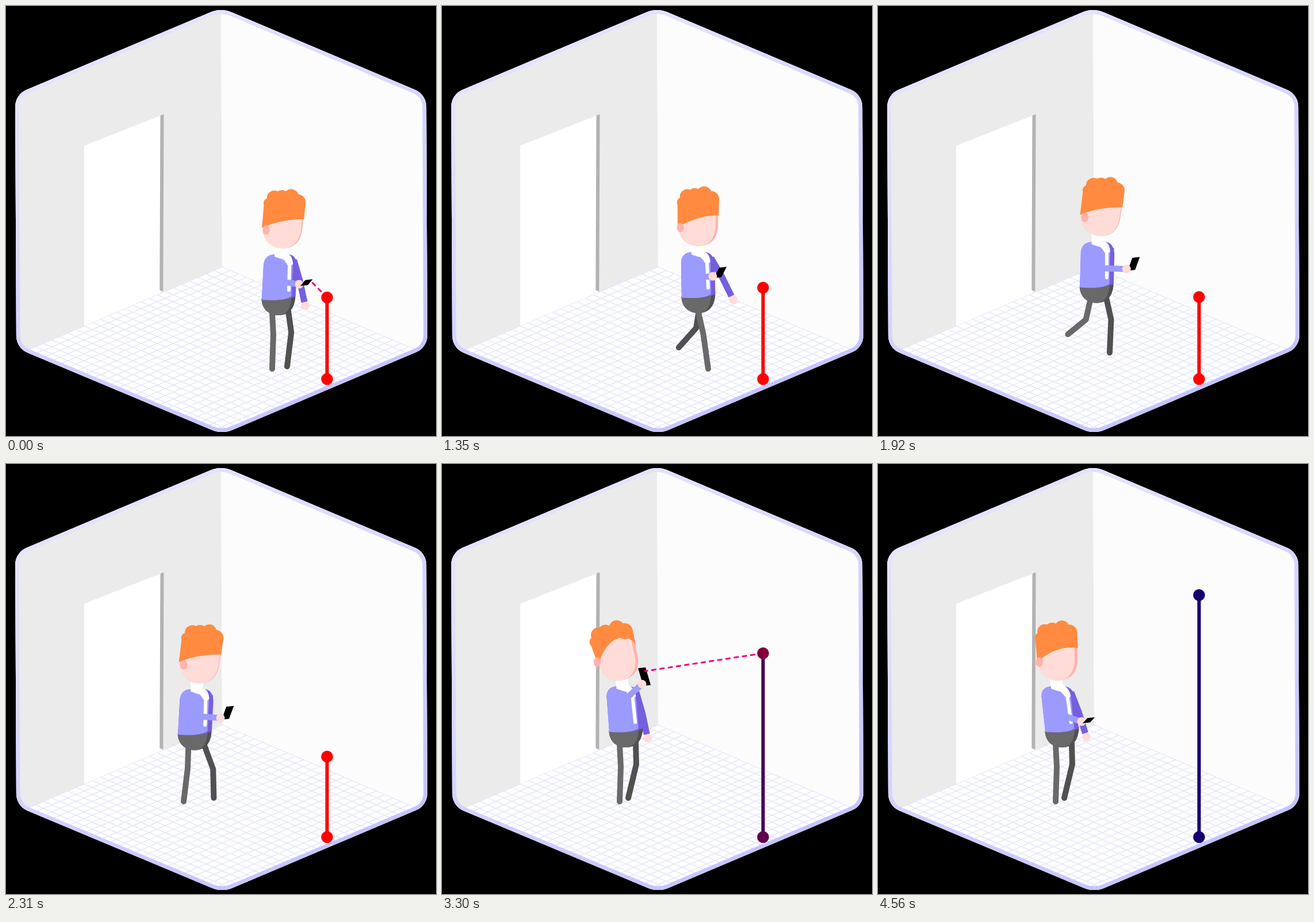
An HTML page with a canvas that plays this animation: 748x748 px, repeating every 4.59 s.

```html
<!DOCTYPE html>
<html lang="en">
<head>
<meta charset="utf-8">
<title>Measuring a height</title>
<style>
  html, body { margin: 0; width: 100%; height: 100%; overflow: hidden; background: #000; }
  canvas { display: block; width: 748px; height: 748px; }
</style>
</head>
<body>
<canvas id="stage" width="748" height="748"></canvas>
<script>
const LOOP = 4590;
const stage = document.getElementById('stage');
const room = document.createElement('canvas');
room.width = room.height = 748;
let g = room.getContext('2d');

// ---- drawing helpers ----
function trace(pts) {
  g.beginPath();
  pts.forEach(([x, y]) => g.lineTo(x, y));
}

function poly(color, pts) {
  g.fillStyle = color;
  trace(pts);
  g.fill();
}

function shape(color, path) {
  g.fillStyle = color;
  g.fill(new Path2D(path));
}

function disc(color, x, y, r, ry = r) {
  g.fillStyle = color;
  g.beginPath();
  g.ellipse(x, y, r, ry, 0, 0, 7);
  g.fill();
}

function line(color, width, pts, cap = 'round') {
  g.strokeStyle = color;
  g.lineWidth = width;
  g.lineCap = cap;
  g.lineJoin = 'round';
  trace(pts);
  g.stroke();
}

function at([x, y], draw) {
  g.save();
  g.translate(x, y);
  draw();
  g.restore();
}

// ---- maths helpers ----
const rad = deg => deg * Math.PI / 180;
const add = (a, b) => [a[0] + b[0], a[1] + b[1]];
const mix = (a, b, k) => a.map((v, i) => v + (b[i] - v) * k);
const clamp = (v, lo, hi) => Math.min(hi, Math.max(lo, v));
const ramp = (t, from, to) => clamp((t - from) / (to - from), 0, 1);
const smooth = u => u * u * (3 - 2 * u);

// Eases through [time, value] keys.
const keys = (t, [first, ...rest]) => rest.reduce(
  ([t0, v], [t1, next]) => [t1, v + (next - v) * smooth(ramp(t, t0, t1))], first)[1];

// ---- motion ----
const nod = t => keys(t, [[0, 5], [1350, 0], [2100, 8], [3680, -17], [3850, -17], [4560, -3]]);
const lean = t => keys(t, [[0, 4], [1350, 0], [2310, 4], [3700, -5.3]]);
const pitch = t => keys(t, [[0, 50], [1350, 63], [1920, 70], [2400, 70], [3680, 116], [3850, 116], [4560, 48]]);
const swing = t => keys(t, [[0, 14], [1350, 28], [1920, -10], [2310, -10], [2970, 10], [3700, 19]]);
const reach = t => keys(t, [[0, 36], [1350, 25], [1920, 52], [2970, 29], [3850, 26], [4560, 34]]);
const raise = t => keys(t, [[0, 25], [1350, 35], [2310, 27], [2650, 27], [3680, 105], [3850, 105], [4560, 16]]);
const ray = t => keys(t, [[0, 507], [350, 517], [1350, 490], [2100, 509], [2790, 509], [3650, 228]]);

function waist(t) {
  const w = ramp(t, 1000, 2370) ** 1.25;
  return add(mix([474, 509], [320, 464], w), [0, 6 * Math.sqrt(Math.sin(Math.PI * Math.min(w, 0.9999)))]);
}

// One stride: the foot glides along the floor line and peaks late.
function stride(t, start, end, a, b) {
  const u = ramp(t, start, end);
  const lift = u * u * (1 - u) * Math.hypot(b[0] - a[0], b[1] - a[1]);
  return { pos: add(mix(a, b, smooth(u)), [0, -lift]), lift };
}

const nearFoot = t => stride(t, 1400, 2080, [463, 631], [309, 587]);
const farFoot = t => t < 2130
  ? stride(t, 950, 1450, [489, 627], [403, 603])
  : stride(t, 2130, 2480, [403, 603], [324, 581]);

// ---- room ----
function hexagon() {
  const v = [[374, 3, 48], [731, 154, 32], [733, 594, 32], [376, 745, 48], [18, 595, 32], [16, 154, 32]];
  g.beginPath();
  g.moveTo(195, 78.5);
  v.forEach(([x, y, r], i) => {
    const [nx, ny] = v[(i + 1) % 6];
    g.arcTo(x, y, nx, ny, r);
  });
  g.closePath();
}

function drawRoom() {
  const back = [376, 454], left = [37, 599], right = [715, 599], front = [376, 744];
  const cells = 24;
  g.save();
  hexagon();
  g.clip();
  g.fillStyle = '#fff';
  g.fillRect(0, 0, 748, 748);
  poly('#ebebeb', [[374, 0], back, left, [0, 615], [0, 0]]);
  poly('#fcfcfc', [[374, 0], back, right, [748, 613], [748, 0]]);
  for (let i = 0; i <= cells; i++) {
    const k = i / cells;
    line('#e3e3ff', 1.3, [mix(back, left, k), mix(right, front, k)]);
    line('#e3e3ff', 1.3, [mix(back, right, k), mix(left, front, k)]);
  }
  poly('#fff', [[136, 243], [269, 190.5], [268, 496], [272, 498], [136, 556.5]]);
  poly('#b2b2b2', [[268.5, 190.5], [274.5, 188.5], [273.3, 496.5], [267.3, 494]]);
  const edge = g.createLinearGradient(200, 50, 550, 700);
  edge.addColorStop(0, '#e4e4ff');
  edge.addColorStop(1, '#c4c4ff');
  g.strokeStyle = edge;
  g.lineWidth = 13.5;
  hexagon();
  g.stroke();
  g.restore();
}

// ---- person ----
const SKIN = '#ffdcd8', BLUSH = '#ffb3ab', HAIR = '#ff8a40';
const JACKET = '#9b9bff', JACKET_DARK = '#755fdf', GREY = '#696969', GREY_DARK = '#505050';

function drawLeg(color, hip, foot, bend) {
  const knee = add(mix(hip, foot.pos, 0.39), [bend + foot.lift * 0.25, foot.lift * 0.5]);
  line(color, 10, [hip, knee, foot.pos]);
}

function drawPelvis() {
  const half = r => `M-29.5 0 C-29 19 -16 29 0 29 C${r * 0.62} 29 ${r} 17 ${r} -7Z`;
  shape(GREY_DARK, half(29.5));
  shape(GREY, half(22.5));
}

function drawTorso(tilt) {
  const body = r => `M-29 2 L-30 -59 Q-29 -76 -12 -77 L14 -77 Q${r - 3} -74 ${r - 1} -56 L${r} -4 Q10 5 -29 2Z`;
  g.transform(1, 0, -tilt, 1, 0, 0);
  shape(JACKET_DARK, body(29.5));
  shape(JACKET, body(22));
  shape('#fff', 'M-13 -98 L9 -98 L9 -79 Q20 -74 21 -60 Q17 -55 11 -59 Q8 -64 4 -68 Q-4 -70 -12 -73Z');
  line('#fff', 6, [[15, -60], [17, -15]]);
}

function drawHead(tip) {
  const arc = 33 * smooth(ramp(-tip, -2, 13));
  const shade = clamp(4 - tip * 0.4, 0, 5);
  const back = arc * 0.15;
  const face = r => `M-35 -42 L-34 3 C-34 24 -18 36 0 36 C${20 - r} 36 ${32 - r} 24 ${34 - r} 4 L${35 - r} -42Z`;
  g.rotate(rad(tip));
  shape(BLUSH, face(0));
  shape(SKIN, face(shade));
  shape(HAIR, `M-36 4 C-18 ${-8 - arc} ${12 + arc * 0.4} ${-16 - arc} 35.5 -18
    L36 -46 L24 -58 L0 -62 L-22 -58 L${-36 - back} -38Z`);
  for (const [x, y, r] of [[-28, -40, 9], [-19, -50, 13], [-6, -52, 13]]) disc(HAIR, x - back, y, r);
  disc(HAIR, 10, -55, 13);
  disc(HAIR, 22, -46, 14);
}

// The phone gets shorter to the eye as it lies flat.
function phoneCorners(hand, deg) {
  const len = 32 * clamp((deg - 25) / 60, 0.3, 1);
  const up = [len * Math.cos(rad(deg)), -len * Math.sin(rad(deg))];
  const a = add(hand, [2, 3]), d = add(a, [13, -1.5]);
  return [a, add(a, up), add(d, up), d];
}

// Returns the point where the measuring beam leaves the phone.
function drawPerson(t) {
  const w = waist(t), from = (x, y) => [w[0] + x, w[1] + y];
  const tip = nod(t), tilt = rad(lean(t)), deg = pitch(t), angle = rad(swing(t));

  const cross = Math.sin(Math.PI * ramp(t, 950, 1700));
  drawLeg(GREY_DARK, from(17 - 16 * cross, 21 + 3 * cross), farFoot(t), 6);
  drawLeg(GREY, from(-11 + 11 * cross, 24 + 3 * cross), nearFoot(t), 2);

  const shoulder = from(22 + 67 * tilt, -67);
  const palm = add(shoulder, [82 * Math.sin(angle), 82 * Math.cos(angle)]);
  const elbow = add(mix(shoulder, palm, 0.45), [1.5, 0]);
  disc(SKIN, ...palm, 7.5);
  line(JACKET_DARK, 11, [shoulder, elbow, mix(elbow, palm, 0.85)], 'butt');

  at(w, drawPelvis);
  at(w, () => drawTorso(tilt));

  const head = from(lean(t) * 0.9 + tip * 0.75, -123.5);
  at(head, () => drawHead(tip));
  disc(BLUSH, head[0] - 31 + tip * 0.45, head[1] + 4, 6.3, 8.3);

  const up = raise(t), hand = from(reach(t), -up);
  const phone = phoneCorners(hand, deg);
  line(JACKET, 10.5, [from(-12 + 60 * tilt, -60), from(8 - up * 0.12, -18 - up * 0.45), hand]);
  const parts = [() => poly('#000', phone), () => disc(SKIN, ...hand, 7.5)];
  if (deg < 58) parts.reverse();
  parts.forEach(draw => draw());
  return mix(mix(phone[1], phone[2], 0.75), phone[3], 0.2);
}

// ---- measured height ----
function drawRay(t, lens) {
  const top = [558.5, ray(t)], foot = [558.5, 649];
  const tint = start => `rgb(${mix([255, 0, 0], [22, 0, 112], ramp(t, start, start + 600)).map(Math.round)})`;

  const alpha = t < 2000 ? 1 - ramp(t, 450, 700) : ramp(t, 2550, 2750) - ramp(t, 3880, 4080);
  if (alpha > 0) {
    const gap = 15 / Math.hypot(top[0] - lens[0], top[1] - lens[1]);
    g.save();
    g.globalAlpha = alpha;
    g.setLineDash([6.5, 8]);
    line('#f5007f', 3, [mix(top, lens, Math.min(1, gap)), lens]);
    g.restore();
  }
  line(tint(2820), 6, [top, foot], 'butt');
  disc(tint(2880), ...foot, 10.3);
  disc(tint(2980), ...top, 10.3);
}

drawRoom();
g = stage.getContext('2d');

function frame() {
  const t = performance.now() % LOOP;
  g.clearRect(0, 0, 748, 748);
  g.drawImage(room, 0, 0);
  drawRay(t, drawPerson(t));
  requestAnimationFrame(frame);
}
frame();
</script>
</body>
</html>
```
